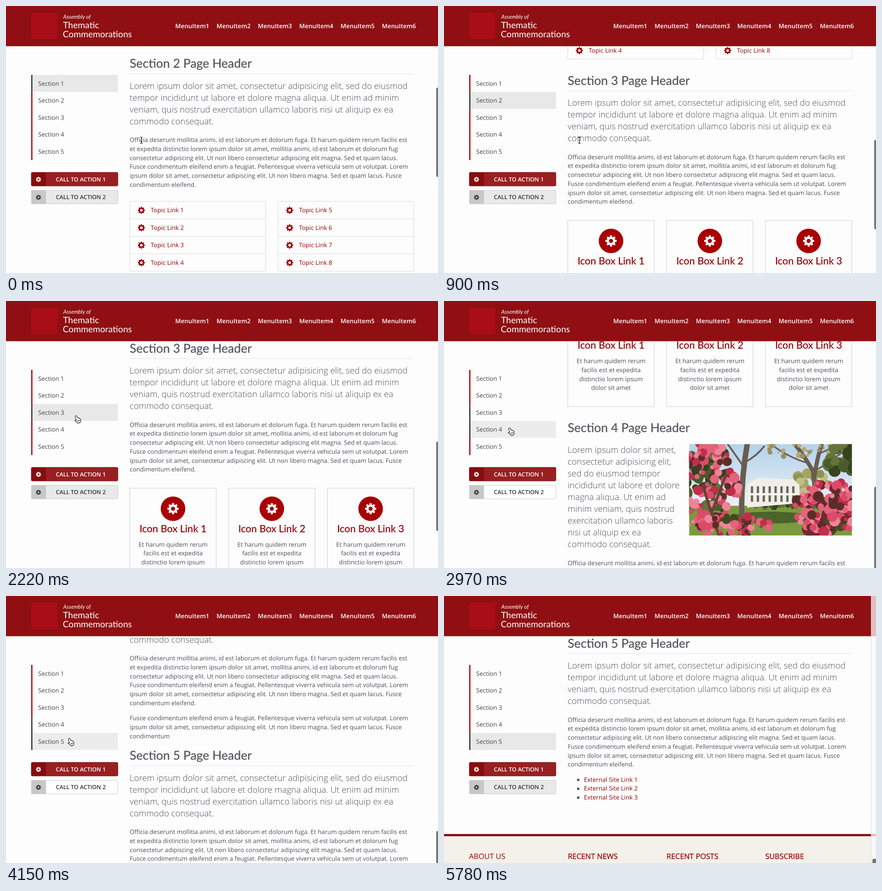
These frames come from a looping animation (951 by 589 pixels, 6.23 s). An HTML page:

```html
<!DOCTYPE html>
<html lang="en">
<head>
<meta charset="utf-8">
<title>Section scroller</title>
<style>
  html, body { margin: 0; width: 100%; height: 100%; overflow: hidden; background: #fdfdfd; }
  svg { display: block; }
  text {
    font: 13.465px "Open Sans", sans-serif;
    fill: #505058;
    text-rendering: geometricPrecision;
  }
  .head { font: 26.93px Lato, sans-serif; fill: #54555f; stroke: #54555f; stroke-width: .3px; }
  .lead { font-size: 18.87px; font-weight: 300; }
  .link { fill: #960004; }
  .box { font: 22px Lato, sans-serif; fill: #960004; stroke: #960004; stroke-width: .25px; }
  .mid { text-anchor: middle; }
  .menu { font-weight: 600; fill: #fff; }
  .brand { font: 19.5px Lato, sans-serif; fill: #fff; }
  .over { font: italic 12.2px Lato, sans-serif; fill: #fff; }
  .nav { fill: #444; }
  .cta { font-size: 12.5px; font-weight: 600; fill: #333; }
  .foot { font-size: 16.4px; fill: #960004; }
  .strong { stroke: #960004; stroke-width: .3px; }
</style>
</head>
<body>
<script>
const RED = "#8f0f12", DEEP = "#a80003", DARK = "#333", BG = "#fdfdfd";
const LOOP = 6230, LAST = 39, LINE = 19.7;

function el(parent, tag, attrs = {}, content) {
  const node = document.createElementNS("http://www.w3.org/2000/svg", tag);
  for (const name in attrs) node.setAttribute(name, attrs[name]);
  if (content !== undefined) node.textContent = content;
  parent.append(node);
  return node;
}
const rect = (p, x, y, width, height, fill, more) => el(p, "rect", { x, y, width, height, fill, ...more });
const text = (p, x, y, str, cls = "") => el(p, "text", { x, y, class: cls }, str);
const group = (p, x = 0, y = 0) => el(p, "g", { transform: `translate(${x} ${y})` });
const lines = (p, x, y, step, list, cls) => list.forEach((s, i) => text(p, x, y + i * step, s, cls));

function gear(parent, cx, cy, r, fill) {
  const points = [];
  for (let i = 0; i < 8; i++) {
    for (const [turn, size] of [[-15, .75], [-9, 1], [9, 1], [15, .75]]) {
      const a = (i * 45 + turn) * Math.PI / 180;
      points.push(`${(cx + r * size * Math.sin(a)).toFixed(2)} ${(cy - r * size * Math.cos(a)).toFixed(2)}`);
    }
  }
  const h = r * .36;
  const hole = `M${cx - h} ${cy}a${h} ${h} 0 1 0 ${2 * h} 0a${h} ${h} 0 1 0 ${-2 * h} 0z`;
  el(parent, "path", { d: `M${points.join("L")}z${hole}`, fill, "fill-rule": "evenodd" });
}

const LEAD = [
  "Lorem ipsum dolor sit amet, consectetur adipisicing elit, sed do eiusmod",
  "tempor incididunt ut labore et dolore magna aliqua. Ut enim ad minim",
  "veniam, quis nostrud exercitation ullamco laboris nisi ut aliquip ex ea",
  "commodo consequat."
];
const NARROW = [
  "Lorem ipsum dolor sit amet,", "consectetur adipisicing elit,", "sed do eiusmod tempor",
  "incididunt ut labore et dolore", "magna aliqua. Ut enim ad", "minim veniam, quis nostrud",
  "exercitation ullamco laboris", "nisi ut aliquip ex ea", "commodo consequat."
];
const BODY = [
  "Officia deserunt mollitia animi, id est laborum et dolorum fuga. Et harum quidem rerum facilis est",
  "et expedita distinctio lorem ipsum dolor sit amet, mollitia animi, id est laborum et dolorum fug",
  "consectetur adipiscing elit. Ut non libero consectetur adipiscing elit magna. Sed et quam lacus.",
  "Fusce condimentum eleifend enim a feugiat. Pellentesque viverra vehicula sem ut volutpat. Lorem",
  "ipsum dolor sit amet, consectetur adipiscing elit. Ut non libero magna. Sed et quam lacus. Fusce",
  "condimentum eleifend."
];

const svg = el(document.body, "svg", { width: 951, height: 589, viewBox: "0 0 951 589" });
rect(svg, 0, 0, 951, 589, BG);
const page = group(svg);

function section(n, y) {
  const g = group(page, 0, y);
  text(g, 272.3, 136.3, `Section ${n} Page Header`, "head");
  if (n !== 4) {
    rect(g, 272, 149, 626, 1, "#e4e4e4");
    lines(g, 272.3, 182.7, 26, LEAD, "lead");
    lines(g, 272.3, 300.2, LINE, BODY);
  }
  return g;
}

// Section 2: topic lists
const topics = section(2, 0);
[272.5, 598.9].forEach((x, col) => {
  rect(topics, x, 431, 299, 154, "none", { stroke: "#d9d9d9", rx: 3 });
  for (let i = 0; i < 4; i++) {
    const y = 450.7 + i * 38.5;
    if (i) rect(topics, x, y - 20, 299, 1, "#dcdcdc");
    gear(topics, x + 25.5, y, 8, "#960004");
    text(topics, x + 46, y + 4.6, `Topic Link ${col * 4 + i + 1}`, "link");
  }
});

// Section 3: icon boxes
const boxes = section(3, 505.5);
[272.5, 490, 707.5].forEach((x, i) => {
  const mid = x + 95.2;
  rect(boxes, x, 435.5, 190.3, 224, "none", { stroke: "#cbcbcb" });
  el(boxes, "circle", { cx: mid, cy: 480.7, r: 27, fill: DEEP });
  gear(boxes, mid, 480.7, 12.5, "#fff");
  text(boxes, mid, 532, `Icon Box Link ${i + 1}`, "box mid");
  ["Et harum quidem rerum", "facilis est et expedita", "distinctio lorem ipsum", "dolor sit amet"]
    .forEach((s, j) => text(boxes, mid, 564 + j * LINE, s, "mid"));
});

// Section 4: picture and long text
const story = section(4, 1084.5);
lines(story, 272.3, 182.7, 26, NARROW, "lead");
lines(story, 272.3, 430.2, LINE, BODY);
lines(story, 272.3, 562.2, LINE, [...BODY.slice(3, 5), "condimentum"]);
drawGarden(story, 539.5, 163.5);

// Section 5: links and footer
const links = section(5, 1597.5);
for (let i = 0; i < 3; i++) {
  const y = 432 + i * LINE;
  el(links, "circle", { cx: 295.5, cy: y - 4, r: 2.8, fill: "#555" });
  text(links, 308, y, `External Site Link ${i + 1}`, "link");
}
rect(links, 0, 547.5, 951, 400, "#f3f1e9");
rect(links, 0, 547.5, 951, 5, RED);
["ABOUT US", "RECENT NEWS", "RECENT POSTS", "SUBSCRIBE"]
  .forEach((s, i) => text(links, 55 + i * 217.4, 602.5, s, i ? "foot strong" : "foot"));

function drawGarden(parent, x, y) {
  const g = el(parent, "svg", { x, y, width: 358.5, height: 201.5 });
  const sky = el(g, "linearGradient", { id: "sky", x2: 0, y2: 1 });
  el(sky, "stop", { offset: 0, "stop-color": "#b4d2ec" });
  el(sky, "stop", { offset: .7, "stop-color": "#edf2f4" });
  rect(g, 0, 0, 359, 202, "url(#sky)");

  let seed = 7;
  const rnd = () => (seed = seed * 16807 % 2147483647) / 2147483647;
  const blobs = (n, cx, cy, rx, ry, size, colors) => {
    for (let i = 0; i < n; i++) {
      const a = rnd() * 2 * Math.PI, d = Math.sqrt(rnd());
      el(g, "circle", {
        cx: (cx + rx * d * Math.cos(a)).toFixed(1), cy: (cy + ry * d * Math.sin(a)).toFixed(1),
        r: (size * (.5 + rnd())).toFixed(1), fill: colors[i % colors.length]
      });
    }
  };
  const branch = (d, width, stroke = "#695c50") =>
    el(g, "path", { d, stroke, fill: "none", "stroke-width": width, "stroke-linecap": "round" });
  const pinks = ["#dc4a69", "#c02e4c", "#ef8497", "#5d2c28", "#e5627b"];
  const greens = ["#4b5b2b", "#35431f", "#66743a"];

  blobs(24, 270, 85, 36, 32, 8, ["#a3a566", "#8d944f", "#c1bd87"]);
  rect(g, 0, 136, 359, 66, "#7b9a3e");
  el(g, "ellipse", { cx: 180, cy: 162, rx: 90, ry: 13, fill: "#4a642a" });
  blobs(26, 185, 135, 58, 7, 5, greens);

  el(g, "path", { d: "M128 88 152 74 230 78 243 90V130L128 140z", fill: "#f1eee7" });
  for (let i = 0; i < 8; i++) {
    rect(g, 136 + i * 13, 93, 5, 15, "#65645f");
    rect(g, 136 + i * 13, 113, 5, 14, "#65645f");
  }
  rect(g, 128, 109, 114, 2, "#fff");

  branch("M116 160Q114 80 128 0", 12);
  branch("M120 50Q100 20 85 0M123 40Q150 25 165 5", 4);
  branch("M274 140Q278 80 272 58Q250 20 232 0M276 70Q282 30 292 0", 9);
  branch("M275 60Q310 40 350 8M262 42Q220 30 180 0M288 20Q310 12 322 0", 3.5);
  blobs(28, 240, 12, 85, 16, 4, ["#b5a974", "#99905f"]);
  blobs(24, 338, 32, 34, 34, 11, greens);

  blobs(32, 40, 90, 55, 100, 13, greens);
  blobs(125, 42, 88, 68, 95, 8, pinks);
  branch("M30 90Q45 140 66 202M80 70 50 150", 6, "#6b4038");
  blobs(60, 90, 180, 92, 23, 7, [...pinks, "#3f4a22"]);
  blobs(25, 300, 160, 62, 40, 14, ["#752635", "#4a4a28"]);
  blobs(130, 308, 140, 75, 60, 8, pinks);
}

// Sidebar
const rows = [];
for (let i = 0; i < 5; i++) {
  const y = 152 + i * 37.55;
  rows.push({
    y,
    fill: rect(svg, 58, y, 188.3, 37.4, "none"),
    bar: rect(svg, 55.5, y, 2.7, 37.6, DEEP)
  });
  text(svg, 70.8, y + 23.6, `Section ${i + 1}`, "nav");
}
function button(y, fill, side, stroke, ink, label) {
  const back = rect(svg, 55.8, y, 190.4, 30, fill, { rx: 2 });
  rect(svg, 56, y, 32, 30, side);
  rect(svg, 55.8, y, 190.4, 30, "none", { rx: 2, stroke });
  gear(svg, 71.5, y + 15.6, 5.8, ink);
  text(svg, 109.8, y + 19.5, label, "cta").style.fill = ink;
  return back;
}
button(367, "#982022", "#880c0f", "#7c0b0e", "#fff", "CALL TO ACTION 1");
const secondButton = button(406.5, "#e9e9e9", "#c8c8c8", "#cdcdcd", DARK, "CALL TO ACTION 2");

// Top bar
rect(svg, 0, 0, 951, 88.7, RED);
rect(svg, 56, 14.5, 57.5, 58.5, "#a90d18");
text(svg, 126, 28, "Assembly of", "over");
text(svg, 125.5, 49.3, "Thematic", "brand");
text(svg, 125, 69, "Commemorations", "brand");
for (let i = 0; i < 6; i++) text(svg, 372.6 + i * 91, 49.2, `MenuItem${i + 1}`, "menu");

// Scrollbar
const track = group(svg);
rect(track, 940, 0, 11, 589, "#fafafa", { opacity: .75 });
rect(track, 940, 0, 1, 589, "#dedede");
const thumb = rect(svg, 947, 0, 9, 197, "#777", { rx: 3 });

// Pointers
const pointer = group(svg);
const ink = { fill: "#fff", stroke: "#111", "stroke-width": 1.1, "stroke-linejoin": "round" };
const shapes = {
  beam: el(pointer, "path", { d: "M-3-7Q0-7 0-5Q0-7 3-7M0-5V5M-3 7Q0 7 0 5Q0 7 3 7M-1.5 2H1.5", fill: "none", stroke: "#111", "stroke-width": 1.2 }),
  hand: el(pointer, "path", { d: "M-3.5-7.5c1.5-.8 2.5 0 2.9 1.2l1.2 3.3 1-.3c1-.3 1.7.2 2 .9 1-.2 1.8.2 2 1 1 0 1.4.6 1.6 1.4l.4 3.2-1 3.9-5.6 1.5-2.5-3-3.5-2c-1-.9 0-2.2 1.2-1.9l1.6.5-2.4-7.6c-.3-1 .1-1.9 1.1-2.1zM1 2.5v2.5M3 2v2.5M5 1.5v2.5", ...ink }),
  arrow: el(pointer, "path", { d: "M-5-8V6l3.2-3 2.2 5 2.2-1-2.2-4.8H5z", ...ink, fill: "#111", stroke: "#fff" })
};

// Step times: 150 ms each, some 10 ms shorter
const shortSteps = [6, 10, 14, 22, 26, 34, 37];
const starts = Array.from({ length: LAST + 1 }, (_, k) => 150 * k - 10 * shortSteps.filter(s => s < k).length);

// Pointer path: step, x, y
const path = [
  [0, 298, 296], [7, 298, 296], [9, 142, 249], [12, 140, 249], [15, 157, 261], [16.5, 150, 284],
  [18, 147, 288], [23, 147, 288], [25, 142, 322], [29, 142, 322], [32, 254, 330], [38, 975, 430], [40, 975, 430]
];
const stops = [23, 528, 1107, 1620];

function pointerAt(k) {
  const i = path.findIndex(p => p[0] > k);
  const [a, b] = [path[i - 1], path[i]];
  const p = (k - a[0]) / (b[0] - a[0]);
  return [a[1] + (b[1] - a[1]) * p, a[2] + (b[2] - a[2]) * p];
}
function swing(k, from) {
  const p = Math.min(1, Math.max(0, (k - from) / 5.4));
  return .5 - Math.cos(p * Math.PI) / 2;
}
function scrollAt(k) {
  const wheel = 500 * (1 - Math.max(0, 1 - k / 9) ** 2.5);
  return wheel + 28 * swing(k, 9.1) + 579 * swing(k, 16.6) + 513 * swing(k, 25.24);
}

function pose(k) {
  const scroll = scrollAt(k);
  const [x, y] = pointerAt(k);
  const active = stops.filter(s => scroll + .5 >= s).length;
  const hover = x < 246 ? rows.findIndex(r => y >= r.y && y < r.y + 37.55) : -1;
  const pale = k >= 18 && k < 31;

  page.setAttribute("transform", `translate(0 ${-scroll})`);
  rows.forEach((row, i) => {
    const lit = i === active, over = i === hover;
    row.bar.setAttribute("fill", lit || over ? DARK : DEEP);
    row.fill.setAttribute("fill", lit ? (pale ? "none" : "#e8e8e8") : over ? "#ececec" : "none");
  });
  secondButton.setAttribute("fill", pale ? "#fefefe" : "#e9e9e9");

  const wide = k >= 38;
  track.style.display = wide ? "" : "none";
  thumb.setAttribute("x", wide ? 943 : 947);
  thumb.setAttribute("rx", wide ? 4 : 3);
  thumb.setAttribute("y", 180 + scroll / 4.055);

  const kind = hover >= 0 ? "hand" : x > 272 && x < 900 ? "beam" : "arrow";
  for (const name in shapes) shapes[name].style.display = name === kind ? "" : "none";
  pointer.setAttribute("transform", `translate(${x} ${y})`);
}

const begin = performance.now();
let shown = -1;
function tick() {
  const t = (performance.now() - begin) % LOOP;
  const k = starts.filter(s => s <= t).length - 1;
  if (k !== shown) pose(shown = k);
  requestAnimationFrame(tick);
}
tick();
</script>
</body>
</html>
```
